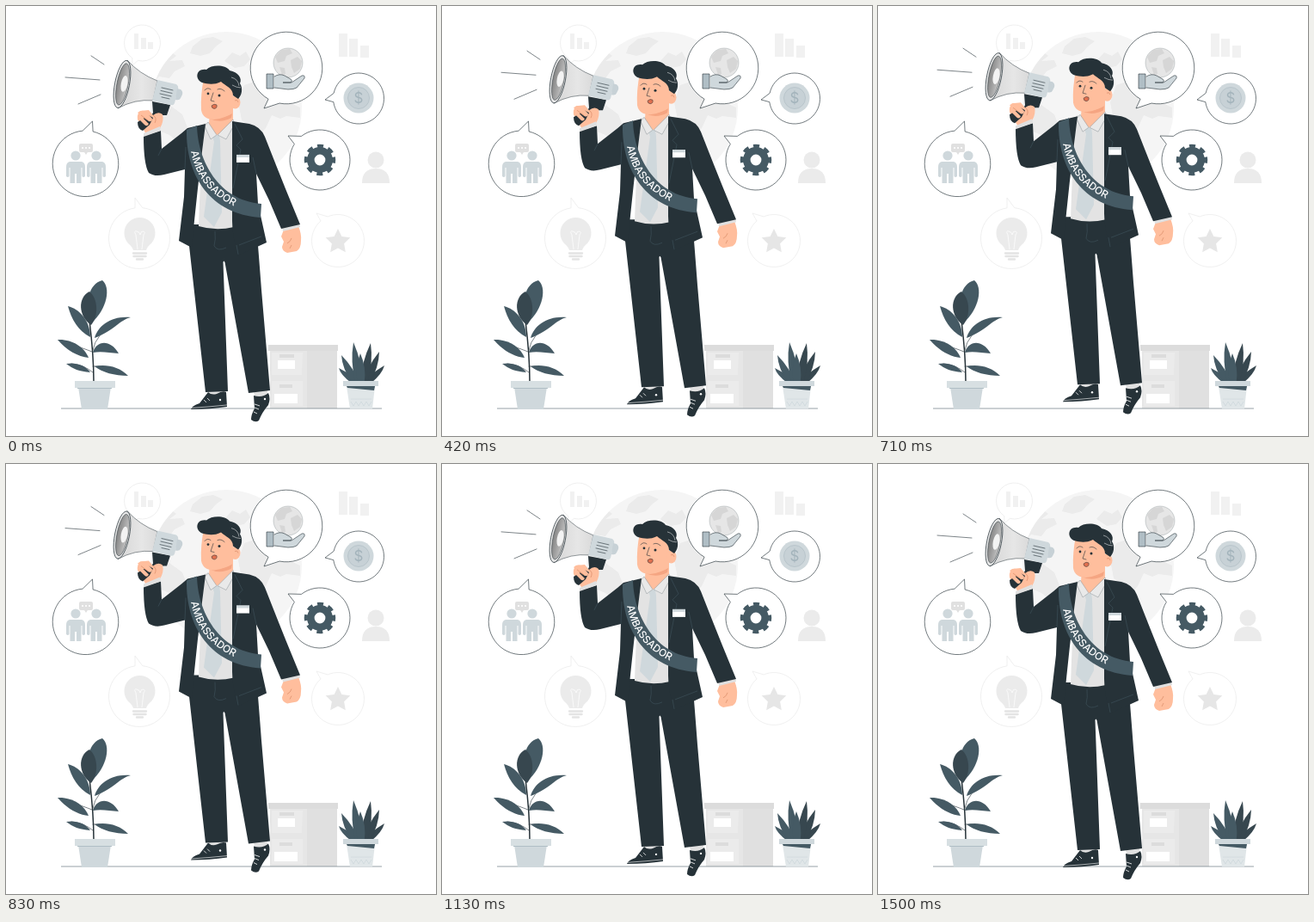
Recreate the animation shown at these times as an HTML page. Size 500 by 500 pixels, loop 1540 ms.

```html
<!DOCTYPE html>
<html lang="en">
<head>
<meta charset="utf-8">
<title>Ambassador</title>
<style>
html, body { margin: 0; height: 100%; overflow: hidden; background: #fff; }
svg { display: block; width: 100vw; height: 100vh; }
.dark { fill: #263238; }
.slate { fill: #455a64; }
.deep { fill: #37474f; }
.blue { fill: #cfd8dc; }
.pale { fill: #ebebeb; }
.faint { fill: #f1f1f1; }
.grey { fill: #e0e0e0; }
.white { fill: #fff; }
.skin { fill: #ffbe9d; }
.line { fill: none; stroke: #263238; stroke-width: .6; stroke-linecap: round; stroke-linejoin: round; }
.crease { fill: none; stroke: #d98b68; stroke-width: .7; }
.seam { fill: none; stroke: #455a64; stroke-width: .5; }
text { font-family: Inter, Lato, sans-serif; }
</style>
</head>
<body>
<svg viewBox="0 0 500 500">
  <defs>
    <linearGradient id="bell">
      <stop offset="0" stop-color="#d6d6d6"/><stop offset=".6" stop-color="#e6e6e6"/><stop offset="1" stop-color="#dadada"/>
    </linearGradient>
    <linearGradient id="mouth">
      <stop offset="0" stop-color="#858585"/><stop offset="1" stop-color="#c4c4c4"/>
    </linearGradient>
    <clipPath id="world"><circle cx="256" cy="118" r="88"/></clipPath>
    <g id="member">
      <circle cy="174" r="5.600"/>
      <path d="M-7 181H7Q11 182 11 187V198Q9 200 7.500 198V188H6.500V206H1V195H-1V206H-6.500V188H-7.500V198Q-9 200-11 198V187Q-11 182-7 181Z"/>
    </g>
  </defs>

  <!-- backdrop -->
  <circle cx="256" cy="118" r="88" fill="#f5f5f5"/>
  <g clip-path="url(#world)" class="pale">
    <path d="M168 76L183 60 193 54 198 58 190 64 205 63 208 70 196 76 190 84 178 82 166 94ZM217 47L228 38 241 36 252 41 244 47 237 55 226 58 214 55ZM254 64L263 54 272 58 279 53 284 62 277 70 266 72ZM277 92L289 88 298 95 308 102 320 108 342 118 342 130 326 128 319 131 309 127 302 142 295 150 285 141 274 133 270 112ZM173 120L190 115 205 126 211 141 200 158 190 150 178 145 168 134Z"/>
  </g>
  <path d="M387 32h10v27h-10zM399 38h10v21h-10zM412 46h10v14h-10z" class="faint"/>
  <path d="M414 206Q414 189 430 189T446 206Z" class="pale"/>
  <circle cx="430" cy="179" r="9.500" class="pale"/>
  <g id="bubbles" stroke-width=".65" stroke-linejoin="round"></g>
  <path d="M149 32h5v18h-5zM157 37h6v13h-6zM165 42h6v8h-6z" class="faint"/>

  <!-- globe in hand -->
  <circle cx="328" cy="66" r="17" fill="#e6e6e6" stroke="#8a9296" stroke-width=".4"/>
  <path d="M313 59L320 51 330 50 333 55 326 58 324 64 316 66ZM331 63L339 59 344 64 342 73 335 78 332 71ZM318 71L324 72 325 79 321 80Z" fill="#d6d6d6"/>
  <path id="palm" d="M312 82Q318 78 324 81L331 85Q334 87 331 89L322 89 332 89 344 81Q348 80 347 84L338 95Q335 97 328 97L312 95" class="line" style="fill:#cfd8dc"/>
  <path d="M303 79H311V96H303Z" fill="#b0bec5" stroke="#263238" stroke-width=".6"/>

  <!-- coin -->
  <circle cx="410" cy="107" r="17.500" class="blue"/>
  <circle cx="410" cy="107" r="12.500" fill="#c7d1d6" stroke="#b0bec5" stroke-width=".7"/>
  <text x="410" y="113" text-anchor="middle" font-size="17" fill="#a3b3bb">$</text>

  <!-- gear -->
  <circle cx="365" cy="179" r="10.700" fill="none" stroke="#455a64" stroke-width="8.600"/>
  <circle cx="365" cy="179" r="16" fill="none" stroke="#455a64" stroke-width="4.500" stroke-dasharray="6.800 5.766" transform="rotate(-12 365 179)"/>

  <!-- team -->
  <path d="M87 160H99Q101 160 101 162V168Q101 170 99 170H95L93 173 91 170H87Q85 170 85 168V162Q85 160 87 160Z" class="grey"/>
  <path d="M89 165h.1M93 165h.1M97 165h.1" stroke="#fff" stroke-width="2" stroke-linecap="round"/>
  <use href="#member" x="81" class="blue"/>
  <use href="#member" x="105" class="blue"/>

  <!-- bulb and star -->
  <path d="M148 284Q147 280 142 276A18 18 0 1 1 169 276Q164 280 163 284Z" class="pale"/>
  <path d="M153 283L151 266Q148 261 152 262T156 266Q157 261 160 262T160 266L158 283" fill="none" stroke="#fff" stroke-width=".7"/>
  <path d="M148 287.500H163M148.500 291H162.500M152 294.500H159" stroke="#e4e4e4" stroke-width="2.400" stroke-linecap="round"/>
  <path id="star" fill="#e6e6e6"/>

  <!-- cabinet -->
  <path d="M307 400H385V468H307Z" class="grey"/>
  <path d="M307 401H350V468H307Z" fill="#e6e6e6"/>
  <path d="M305 394H386V401H305Z" fill="#dcdcdc"/>
  <path d="M309 403H345L344 429H309ZM309 436H345V465H309Z" class="pale"/>
  <path d="M318 405h17v4h-17zM318 440h15v4h-15z" fill="#dcdcdc"/>
  <path d="M316 412h20v10h-20zM312 451h27v11h-27z" class="white"/>
  <path d="M64 468H437" stroke="#6b7a82" stroke-width=".7"/>

  <!-- leafy plant -->
  <path d="M101 426Q90 417 76 416M101 419Q115 417 136 428M100 402Q90 398 66 390M101 400Q104 382 128 367" class="line"/>
  <path d="M102 438Q102 405 97 366" fill="none" stroke="#263238" stroke-width="1.500"/>
  <g class="slate">
    <path d="M99 369C91 345 96 323 112 319C122 327 118 352 99 369Z"/>
    <path d="M98 385C84 378 76 364 72 349C85 352 98 366 98 385Z"/>
    <path d="M103 386C107 372 122 360 145 362C132 365 125 378 103 386Z"/>
    <path d="M96 409C84 408 70 400 60 388C76 387 91 396 96 409Z"/>
    <path d="M101 403C105 389 121 387 131 404C120 403 110 401 101 403Z"/>
    <path d="M98 426C85 425 78 422 70 416C80 414 92 417 98 426Z"/>
    <path d="M103 419C115 416 132 419 142 430C126 430 112 426 103 419Z"/>
  </g>
  <path d="M99 371C84 361 83 339 97 332C107 340 108 360 99 371Z" class="deep"/>
  <path d="M84 443H122L118 469H88Z" class="blue"/>
  <path d="M80 436H127V444H80Z" fill="#d7dfe2"/>
  <path d="M83 444.500H123" stroke="#b0bec5"/>

  <!-- spiky plant -->
  <g id="blades"></g>
  <path d="M396 442H429L426 468.500H400Z" fill="#e0e6e8"/>
  <path d="M396 442H429L428 447 397 444Z" class="slate"/>
  <path d="M392 436H433V442H392Z" class="blue"/>
  <path d="M401 460L404 465 407 460 410 465 413 460 416 465 419 460 422 465 425 460M401 457H425" fill="none" stroke="#cfd8dc" stroke-width=".8"/>

  <g id="man">
    <path d="M99 58L114 68M69 83L109 86M84 114L110 103" class="line"/>

    <!-- shoes -->
    <path d="M236 445H256V453H236ZM288 448L304 445 304 457 290 460Z" class="grey"/>
    <path d="M235 449Q239 453 245 451Q252 447 256 449L257 466Q237 469 215 469Q216 465 225 462Z" class="dark"/>
    <path d="M215 467.500Q238 466 257 464" fill="none" stroke="#fff" stroke-width=".6"/>
    <path d="M288 453Q298 456 305 450Q308 456 305 464Q298 472 294 482Q290 485 285 481Q285 475 289 468Z" class="dark"/>
    <path d="M230 458l3 3M234 456l3 3M289 463l6 2M289 467l5 2M288 472l4 2" stroke="#fff" stroke-width=".8"/>
    <circle cx="249" cy="458" r="1.200" class="white"/>
    <circle cx="301" cy="457" r="1.200" class="white"/>

    <!-- trousers and shirt -->
    <path d="M214 254H291Q294 290 297 330L307 447 282 450 254.500 298Q253 295 252.500 298L258 448 232 449 212 270Z" class="dark"/>
    <path d="M243 262Q244 272 242 279Q246 286 256 281" class="seam"/>
    <path d="M231 136L264 134 265 257Q244 262 224 256Q226 190 231 136Z" fill="#e3e3e3"/>
    <path d="M240 151L248 150 249 157 251 240 242 257 230 245 242 158Z" class="blue"/>
    <path d="M237 122L264 116 264 135Q252 149 246 150Q238 146 236 137Z" class="skin"/>
    <path d="M235 135L245 150 238 155 231 140ZM264 132L246 150 256 155 266 137Z" fill="#e9e9e9" stroke="#8a9296" stroke-width=".5"/>

    <!-- hanging hand -->
    <path d="M323 260L340 256Q344 266 343 273Q343 282 338 285L327 287Q321 285 321 280L323 274 320 268Z" class="skin"/>
    <path d="M327 276Q331 274 332 270M332 278L330 282" class="crease"/>
    <path d="M321 257L341 252 342 257 322 262Z" class="grey"/>

    <!-- jacket -->
    <path d="M232 137L211 142 204 148 181 166 180 145 160 151Q160 184 166 194Q173 199 184 196L208 190 207 222 201 273 216 281Q222 215 232 137Z" class="dark"/>
    <path d="M263 134L283 137Q296 140 301 152L314 185 326 215 342 254 320 259 306 226 291 195 293 230 303 275 270 290Q263 268 263 250Z" class="dark"/>
    <path d="M181 166L177 174M208 190L209 164M266 137L275 155 268 162 273 167 264 212M291 195L287 176M271 278L297 268M270 289L268 278" class="seam"/>
    <path d="M268 173H283V182H268Z" class="white"/>
    <path d="M268 173H283V176H268Z" class="blue"/>

    <!-- sash -->
    <path d="M210 144L222 139C223 180 247 226 297 230L296 246C238 242 209 198 210 144Z" class="slate"/>
    <path id="sash" d="M215 169C220 198 238 224 278 238" fill="none"/>
    <text font-size="11.900" font-weight="500" fill="#fff"><textPath href="#sash">AMBASSADOR</textPath></text>

    <!-- head -->
    <path d="M237 126Q249 134 263 125L262 130Q249 137 237 131Z" fill="#f5a582"/>
    <path d="M230 84Q226 104 227 121Q229 132 242 132Q256 131 264 121L264 85Z" class="skin"/>
    <ellipse cx="266.500" cy="112" rx="6" ry="7.500" class="skin"/>
    <path d="M228 89C219 85 221 72 233 74C239 68 255 68 260 75C270 77 275 84 272 90C276 96 274 104 270 108L264 104C264 95 255 93 250 88C242 92 235 91 228 89Z" class="dark"/>
    <path d="M262 83Q270 85 271 93M263 92Q268 95 273 95" fill="none" stroke="#fff" stroke-width=".5"/>
    <path d="M231 98Q234 94 238 97M246 97Q250 95 254 99M241 101L238 110 242 111" class="line"/>
    <circle cx="235" cy="102" r="1.400" class="dark"/>
    <circle cx="248" cy="104" r="1.500" class="dark"/>
    <path d="M239 116Q242 113 245 115Q246 119 242 119.500Q239 119 239 116Z" fill="#e0704f" stroke="#263238" stroke-width=".5"/>
    <path d="M266 110Q269 108 270 112" class="crease"/>

    <!-- megaphone -->
    <path d="M170 111L191 115 187 127 178 127 170 142 162 140 171 124Z" class="dark"/>
    <path d="M141 63Q155 79 176 87L171 110Q150 108 130 119Z" fill="url(#bell)" stroke="#263238" stroke-width=".5"/>
    <path d="M176 86L198 91Q201 93 200 97L196 113Q195 116 191 115L170 110Z" class="blue"/>
    <path d="M199 96L203 97Q206 99 205 103L203 107Q202 110 197 109Z" fill="#c7d1d6"/>
    <path d="M181 95L194 98M180 98.500L193 101.500M179 102L192 105M181 106L190 108" class="line"/>
    <ellipse cx="135" cy="91" rx="8.500" ry="28" transform="rotate(11 135 91)" fill="#e8e8e8" stroke="#263238" stroke-width=".7"/>
    <ellipse cx="135.500" cy="91" rx="6.600" ry="24.500" transform="rotate(11 135.500 91)" fill="url(#mouth)" stroke="#263238" stroke-width=".5"/>
    <ellipse cx="137.500" cy="90.500" rx="3.700" ry="9.500" transform="rotate(11 137.500 90.500)" fill="#f3f3f3"/>

    <!-- raised hand -->
    <path d="M163 149L179 142Q184 134 182 126Q177 122 171 127L166 121 156 122Q152 126 153 132L157 139Q160 144 163 149Z" class="skin"/>
    <path d="M153 135L166 127 171 130 167 138 159 145Q153 143 153 135Z" class="dark"/>
    <path d="M153 124Q158 120 163 123L170 131Q170 135 166 134L156 127ZM153 130Q156 127 159 130L166 137Q164 141 161 138Z" class="skin"/>
    <path d="M157 127L165 133M171 127Q176 130 173 136" class="crease"/>
    <path d="M160 148L179 140 180 145 160 152Z" class="grey"/>
  </g>
</svg>
<script>
const PERIOD = 1540, LEAD = 40, RISE = 8.8;
const find = id => document.getElementById(id);
const polar = (x, y, r, deg) => {
  const a = deg * Math.PI / 180;
  return `${x + r * Math.cos(a)} ${y + r * Math.sin(a)}`;
};

// Speech bubble: circle with a tail between angles a and b.
const bubble = (x, y, r, a, b, tip, stroke) =>
  `<path d="M${polar(x, y, r, a)}L${tip}L${polar(x, y, r, b)}A${r} ${r} 0 1 1 ${polar(x, y, r, a)}Z" fill="#fff" stroke="${stroke}"/>`;

find('bubbles').innerHTML = [
  [158.5, 43, 21, 104, 124, '147 69', '#e6e6e6'],
  [326, 72, 41.8, 101, 120, '300 119', '#263238'],
  [410, 107.5, 29.5, 172, 192, '371 109', '#263238'],
  [365, 179, 35, 212, 232, '328 151', '#263238'],
  [92.5, 183.3, 38.3, 265, 283, '100.5 134', '#263238'],
  [155, 270, 35.5, 262, 276, '150 223', '#e6e6e6'],
  [386, 273, 30.5, 229, 247, '361 241', '#e8e8e8']
].map(b => bubble(...b)).join('');

const points = Array.from({ length: 10 }, (_, i) => polar(386, 274, i % 2 ? 7.5 : 15, i * 36 - 90));
find('star').setAttribute('d', `M${points.join('L')}Z`);

const blade = ([x, y], i) => {
  const base = 413 + (x - 413) * .3, mx = (x + base) / 2, my = (y + 437) / 2;
  return `<path class="${i % 2 ? 'deep' : 'slate'}" d="M${base - 4} 438Q${mx - 7} ${my} ${x} ${y}Q${mx + 7} ${my} ${base + 4} 438Z"/>`;
};
find('blades').innerHTML = [[387, 421], [440, 418], [390, 406], [434, 402], [404, 391], [424, 392], [412, 404]].map(blade).join('');

const man = find('man');
function draw(now) {
  const phase = 2 * Math.PI * (now + LEAD) / PERIOD;
  man.setAttribute('transform', `translate(0 ${-RISE / 2 * (1 - Math.cos(phase))})`);
  requestAnimationFrame(draw);
}
draw(0);
</script>
</body>
</html>
```
